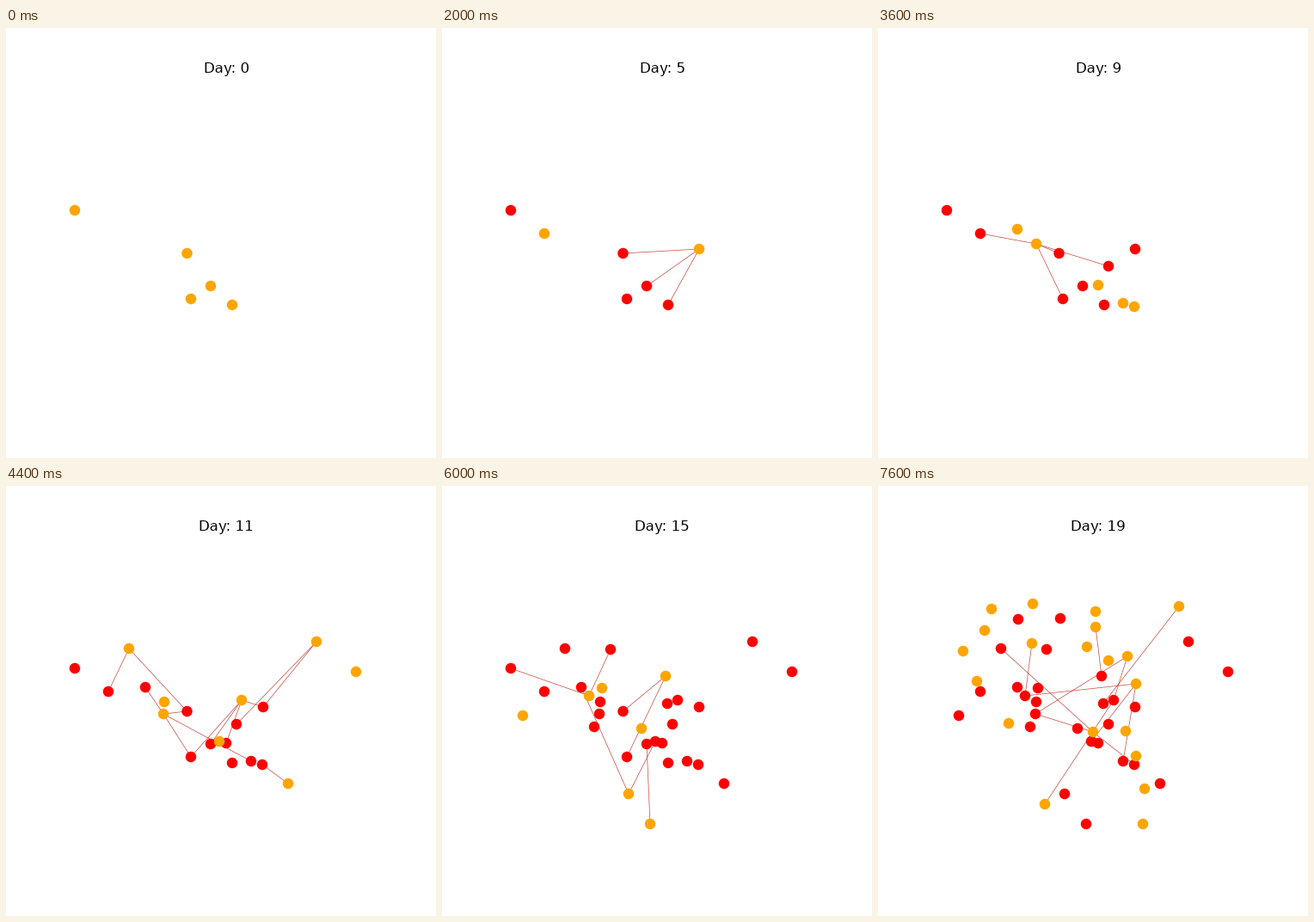
These frames come from a looping animation (500x500 px, 8000 ms). A matplotlib script:

```python
import math
import random

import matplotlib.pyplot as plt
from matplotlib.animation import FuncAnimation
from matplotlib.collections import LineCollection

plt.rcParams["text.hinting"] = "native"

SIZE, DPI = 500, 100
DAYS, INTERVAL = 20, 400
INCUBATION, SICK_DAYS = 3, 16
REACH, MAX_CONTACTS = 150, 4

# Homes of the people, grouped by the day they are infected
HOMES = {
    0: [(80, 212), (210.5, 262), (215, 315), (238, 300), (263, 322)],
    4: [(119, 239)],
    5: [(299, 257)],
    6: [(268, 277)],
    7: [(298, 324)],
    8: [(162, 234), (285, 320), (256, 299)],
    9: [(184, 251)],
    10: [(407, 216), (248, 297)],
    11: [(361, 181), (143, 189), (183, 265), (274, 249), (328, 346)],
    12: [(196, 190), (177, 280), (262, 253)],
    13: [(232, 282), (94, 267)],
    14: [(186, 235)],
    15: [(171, 244), (242, 393), (260, 221), (217, 358)],
    16: [(163, 155), (212, 154)],
    17: [(124, 168), (268, 203), (115, 227), (152, 276), (308, 393),
         (132, 143), (180, 137), (288, 285), (300, 314)],
    18: [(99, 192), (243, 187), (253, 146), (310, 352)],
    19: [(179, 183), (253, 164), (290, 198), (300, 230), (194, 370),
         (250, 286), (350, 140)],
}


def colored(day):
    """Homes shown on a day, each with its colour."""
    for start, homes in HOMES.items():
        age = day - start
        if 0 <= age < INCUBATION + SICK_DAYS:
            color = "orange" if age < INCUBATION else "red"
            yield from ((home, color) for home in homes)


def contacts(day):
    """Lines from the newly infected to sick people within reach."""
    rng = random.Random(day)
    sick = [home for home, color in colored(day) if color == "red"]
    lines = []
    for new in HOMES.get(day, []):
        near = [home for home in sick if math.dist(new, home) < REACH]
        count = min(len(near), rng.randint(1, MAX_CONTACTS))
        lines += [(new, met) for met in rng.sample(near, count)]
    return lines


fig = plt.figure(figsize=(SIZE / DPI, SIZE / DPI), dpi=DPI, facecolor="white")
ax = fig.add_axes([0, 0, 1, 1])
ax.set_xlim(0, SIZE)
ax.set_ylim(SIZE, 0)
ax.axis("off")

title = ax.text(256.25, 51.67, "", ha="center", va="baseline",
                fontsize=12, family="DejaVu Sans")
links = ax.add_collection(LineCollection([], colors="#c8463c", linewidths=0.5, zorder=1))
dots = ax.scatter([], [], s=81, linewidths=0, zorder=2)


def draw(day):
    homes, colors = zip(*colored(day))
    dots.set_offsets(homes)
    dots.set_facecolor(colors)
    links.set_segments(contacts(day))
    title.set_text(f"Day: {day}")
    return dots, links, title


anim = FuncAnimation(fig, draw, frames=DAYS, interval=INTERVAL, repeat=True, repeat_delay=0)
plt.show()
```
